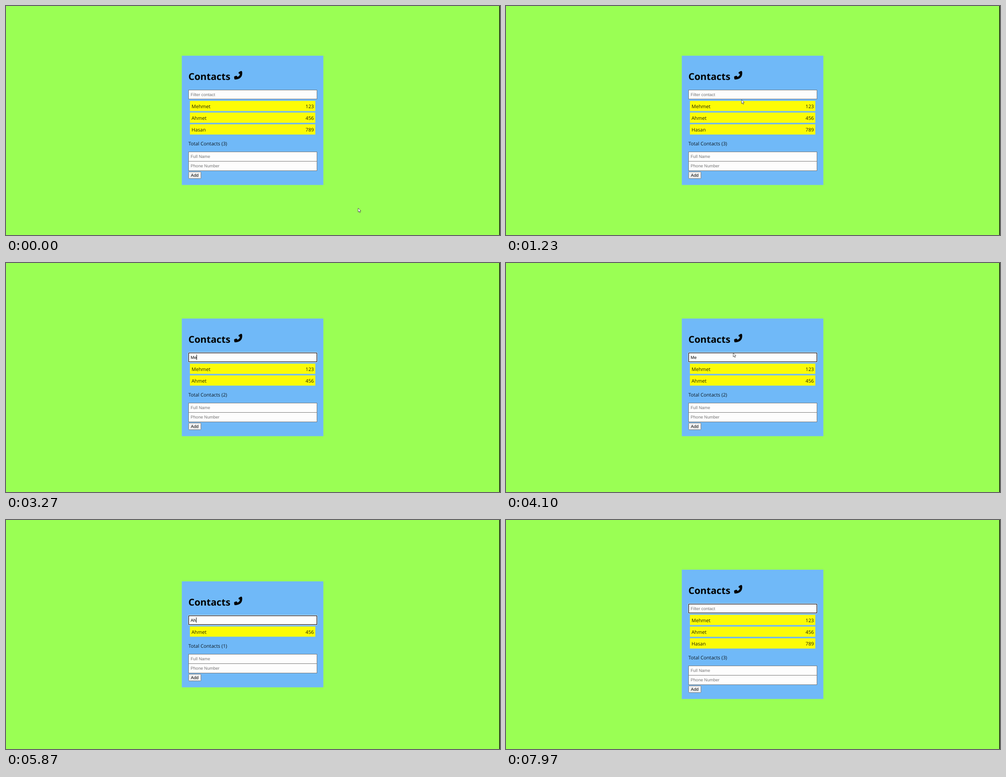
These frames come from a looping animation (1097 px wide and 511 px high, 8 s). An HTML page:

```html
<!DOCTYPE html>
<html lang="en">
<head>
<meta charset="utf-8">
<title>Contacts</title>
<style>
  html, body { margin: 0; width: 100%; height: 100%; overflow: hidden; background: #9aff54; }
  svg { display: block; width: 1097px; height: 511px; }
  text { text-rendering: geometricPrecision; white-space: pre; }
  .ui { font: 10.75px "Open Sans", "Noto Sans", sans-serif; fill-opacity: .88; }
  .title { font: 700 21.2px "Open Sans", "Noto Sans", sans-serif; }
  .field { font: 9.5px "Liberation Sans", Arial, sans-serif; }
  .hint { fill: #757575; }
  .end { text-anchor: end; }
  .box { fill: #fdfdfd; stroke: #767676; }
</style>
</head>
<body>
<svg viewBox="0 0 1097 511" xmlns="http://www.w3.org/2000/svg">
  <rect width="1097" height="511" fill="#9aff54"/>
  <rect x="1095.5" width="1.5" height="511"/>
  <rect id="card" x="390.4" width="314.3" fill="#70b9f8"/>

  <g id="upper">
    <text class="title" x="405" y="165">Contacts</text>
    <g fill="none" stroke="#000" stroke-linecap="round" stroke-linejoin="round">
      <path d="M522 149Q522.5 156 517.5 159.3Q514 161.8 509.5 161.6" stroke-width="5"/>
      <path d="M518.6 149.2L522.2 147.2M508.6 158.7L511.6 157.8M508.6 158.7L509.2 161.8" stroke-width="4.2"/>
    </g>
    <rect class="box" x="405.5" y="187.5" width="285" height="20"/>
    <g id="ring" fill="none">
      <rect x="404.5" y="186.5" width="287" height="22" rx="2" stroke="#fff" stroke-opacity=".8"/>
      <rect x="405.6" y="187.6" width="284.8" height="19.8" rx="1.2" stroke="#101018" stroke-width="1.3"/>
    </g>
    <text id="query" class="field" x="410" y="200.6"></text>
    <rect id="caret" y="191.5" width="1" height="11.5"/>
    <g id="rows"></g>
  </g>

  <g id="lower">
    <text id="total" class="ui" x="405" y="310.8"></text>
    <rect class="box" x="405.5" y="325.5" width="285" height="21"/>
    <text class="field hint" x="410" y="338.8">Full Name</text>
    <rect class="box" x="405.5" y="346.5" width="285" height="21"/>
    <text class="field hint" x="410" y="360">Phone Number</text>
    <rect x="405.5" y="370" width="27.5" height="15" rx="1.5" fill="#efefef" stroke="#767676"/>
    <text class="field" x="410.6" y="380.6">Add</text>
  </g>

  <path id="pointer" d="M0 0V8.8L2 7L3.4 10.2L4.9 9.6L3.5 6.4H6.2Z" fill="#fff" stroke="#333" stroke-width=".8" stroke-linejoin="round"/>
</svg>
<script>
const LOOP = 8000, FOCUS = 1570, ROW = 26.2;
const contacts = [['Mehmet', '123'], ['Ahmet', '456'], ['Hasan', '789']];

// [time, value]: each value holds until the next time
const typing = [[0, ''], [2100, 'M'], [2870, 'Me'], [4300, 'M'], [4400, ''],
                [5300, 'A'], [5470, 'Ah'], [6470, 'A'], [6900, '']];
const blink = [[0, false], [FOCUS, true], [2630, false], [2870, true], [3400, false],
               [4130, true], [4900, false], [5300, true], [5970, false], [6470, true], [7500, false]];
const pointing = [[0, true], [2100, false], [3670, true], [5300, false]];

// [time, x, y] of the pointer tip
const path = [[0, 782, 451], [30, 782, 451], [830, 530, 205], [870, 530, 205],
              [1230, 523, 209], [1270, 523, 209], [1540, 504.5, 200.5]];

const $ = id => document.getElementById(id);
const held = (steps, t) => steps.findLast(s => s[0] <= t)[1];
const ease = u => u * u * (3 - 2 * u);
const show = (el, on) => el.setAttribute('visibility', on ? 'visible' : 'hidden');
const move = (el, x, y) => el.setAttribute('transform', `translate(${x} ${y})`);

const rows = contacts.map(([name, number]) => {
  const g = document.createElementNS('http://www.w3.org/2000/svg', 'g');
  g.innerHTML = `<rect x="408.4" y="211.6" width="278.5" height="22.8" fill="#fdfc06"/>
    <text class="ui" x="412" y="228">${name}</text>
    <text class="ui end" x="683.7" y="228">${number}</text>`;
  $('rows').append(g);
  return g;
});

function pointerAt(t) {
  const i = path.findLastIndex(p => p[0] <= t);
  const a = path[i], b = path[i + 1];
  if (!b) return [a[1], a[2]];
  const u = ease((t - a[0]) / (b[0] - a[0]));
  return [a[1] + (b[1] - a[1]) * u, a[2] + (b[2] - a[2]) * u];
}

function draw(t) {
  const typed = held(typing, t);
  const query = $('query');
  query.textContent = typed || 'Filter contact';
  query.setAttribute('class', typed ? 'field' : 'field hint');

  let count = 0;
  contacts.forEach(([name], i) => {
    const match = name.toLowerCase().includes(typed.toLowerCase());
    rows[i].setAttribute('display', match ? 'inline' : 'none');
    if (match) move(rows[i], 0, ROW * count++);
  });
  $('total').textContent = `Total Contacts (${count})`;

  // the card stays centred, so both halves close in by whole pixels
  const shift = Math.round((contacts.length - count) * ROW / 2);
  $('card').setAttribute('y', 110.9 + shift);
  $('card').setAttribute('height', 288.5 - 2 * shift);
  move($('upper'), 0, shift);
  move($('lower'), 0, -shift);

  show($('ring'), t >= FOCUS);
  show($('caret'), held(blink, t));
  $('caret').setAttribute('x', 410 + (typed ? Math.round(query.getComputedTextLength()) : 0));
  show($('pointer'), held(pointing, t));
  move($('pointer'), ...pointerAt(t));
}

const start = performance.now();
function tick(now) {
  draw(Math.max(0, now - start) % LOOP);
  requestAnimationFrame(tick);
}
draw(0);
requestAnimationFrame(tick);
</script>
</body>
</html>
```
